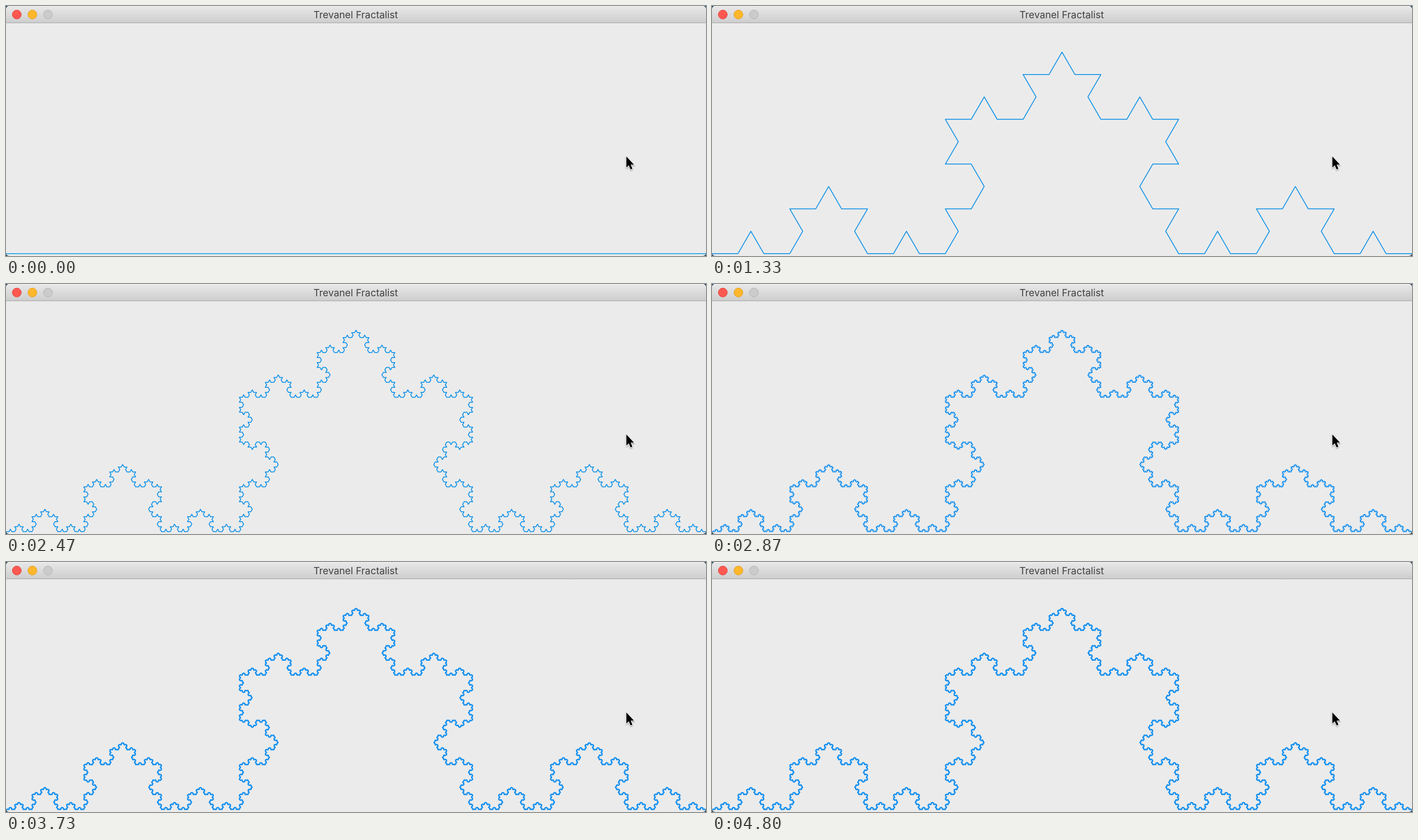
An HTML page that plays this animation: 1251 px wide and 448 px high, repeating every 4.94 s.

```html
<!DOCTYPE html>
<html lang="en">
<head>
<meta charset="utf-8">
<title>Trevanel Fractalist</title>
<style>
  html, body { margin: 0; width: 100%; height: 100%; overflow: hidden; background: #2c4a61; }
  svg { display: block; width: 1251px; height: 448px; }
  .title { font: 17.5px Inter, "Open Sans", sans-serif; fill: #404040; text-anchor: middle; }
  #curve { fill: none; stroke-width: 1.5; stroke-linejoin: round; }
</style>
</head>
<body>
<svg viewBox="0 0 1251 448">
  <defs>
    <linearGradient id="bar" x2="0" y2="1">
      <stop offset="0" stop-color="#e9e8e9"/>
      <stop offset="1" stop-color="#cfcecf"/>
    </linearGradient>
    <clipPath id="window"><rect width="1251" height="448" rx="6"/></clipPath>
    <filter id="shadow" x="-50%" y="-50%" width="200%" height="200%">
      <feDropShadow dx="0" dy="1.5" stdDeviation="1.3" flood-opacity=".4"/>
    </filter>
  </defs>
  <g clip-path="url(#window)">
    <rect width="1251" height="448" fill="#ebebeb"/>
    <rect width="1251" height="30" fill="url(#bar)"/>
    <rect width="1251" height="1" fill="#f4f4f4"/>
    <rect y="29.5" width="1251" height="1.2" fill="#acacac"/>
    <circle cx="19.3" cy="15.3" r="8" fill="#fe5850" stroke="#e2463f"/>
    <circle cx="47.2" cy="15.3" r="8" fill="#ffb72b" stroke="#e0a023"/>
    <circle cx="75" cy="15.3" r="8" fill="#cbcbcb" stroke="#b5b5b5"/>
    <text class="title" x="625" y="22">Trevanel Fractalist</text>
    <path id="curve"/>
  </g>
  <path filter="url(#shadow)" d="M1108.6 269.5V289.6L1113 285.5L1116.2 292.8L1119.5 291.4L1116.4 284.3H1122.3Z"
        stroke="#fff" stroke-width="1.6" paint-order="stroke"/>
</svg>
<script>
  const LOOP = 4940, WIDTH = 1251, BASE = 443.8;
  const starts = [0, 400, 870, 1330, 1800, 2270, 2870, 3400, 4000];
  const curve = document.getElementById("curve");

  function koch(level) {
    const points = ["M0 " + BASE];
    let x = 0, y = BASE;
    const step = WIDTH / 3 ** level;
    (function draw(depth, turn) {
      if (depth) {
        for (const bend of [0, -1, 1, 0]) draw(depth - 1, turn + bend);
        return;
      }
      x += step * Math.cos(turn * Math.PI / 3);
      y += step * Math.sin(turn * Math.PI / 3);
      points.push(x.toFixed(2) + " " + y.toFixed(2));
    })(level, 0);
    return points.join("L");
  }

  const shapes = starts.map((_, level) => koch(level));
  let shown = -1;

  function frame(now) {
    const time = now % LOOP;
    const level = starts.filter(start => start <= time).length - 1;
    if (level !== shown) {
      shown = level;
      curve.setAttribute("d", shapes[level]);
      curve.setAttribute("stroke", level ? level < 6 ? "#0a90e8" : "#0a8cf0" : "#12a0e8");
    }
    requestAnimationFrame(frame);
  }
  frame(performance.now());
</script>
</body>
</html>
```
